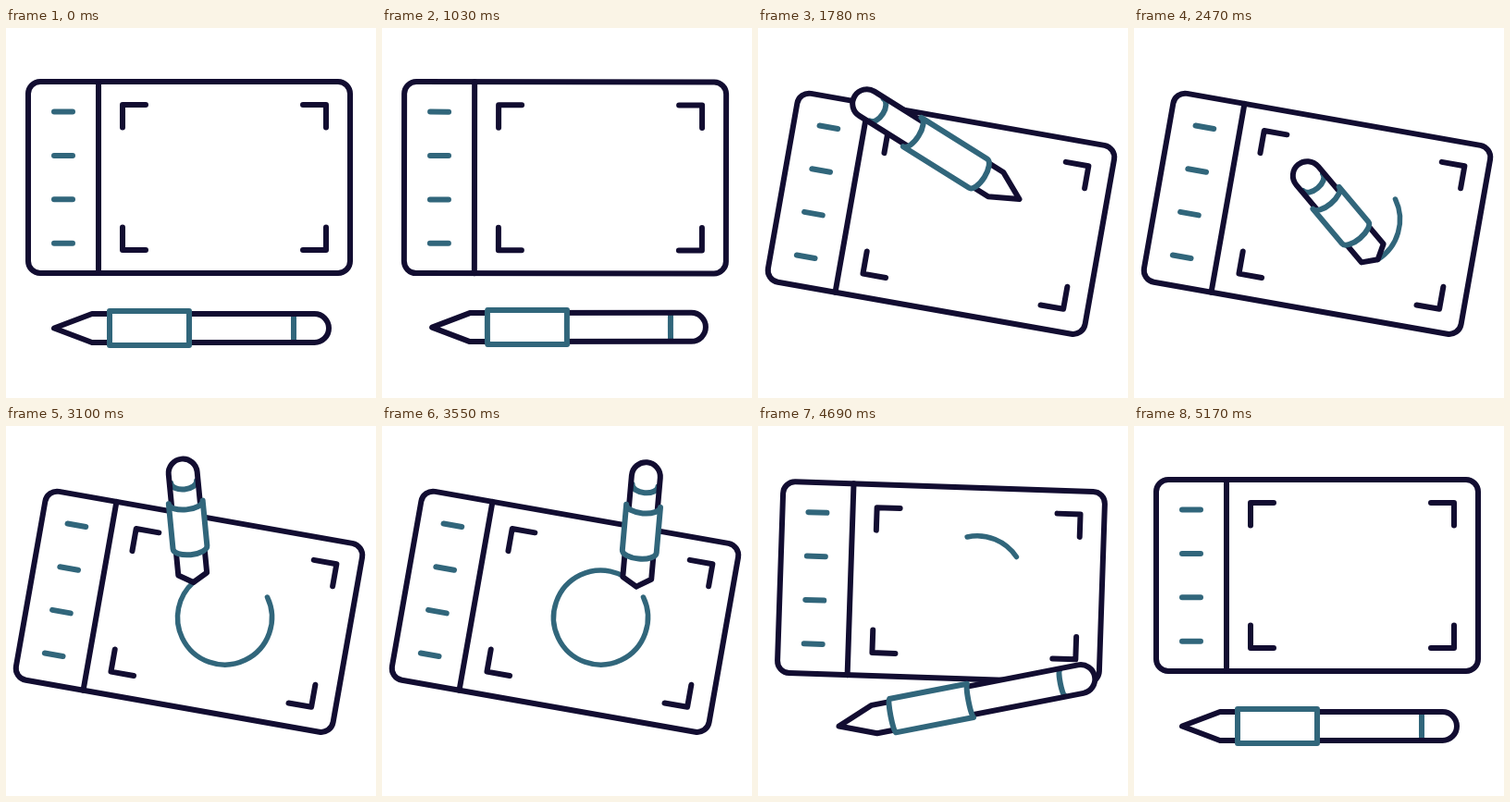
An HTML page with a canvas for the animation above (5.23 s loop, 400 by 400 pixels).

```html
<!DOCTYPE html>
<html lang="en">
<head>
<meta charset="utf-8">
<title>Drawing tablet</title>
<style>
html, body { margin: 0; width: 100%; height: 100%; overflow: hidden; background: #fff; }
canvas { display: block; width: 400px; height: 400px; }
</style>
</head>
<body>
<canvas id="stage" width="400" height="400"></canvas>
<script>
const ctx = document.getElementById('stage').getContext('2d');
const LOOP = 5230, REST = 1030, STEP = 30;
const DARK = '#120d31', TEAL = '#31667b';
const RAD = Math.PI / 180, UP = -Math.PI / 2, DOWN = Math.PI / 2;
const RADIUS = 51, TILT = 10, START = -25.6;

// Pen parts as distances from the tip, from most to least foreshortened
const SHAPES = [
  { len: 134, cone: 9, front: 34, back: 83, stripe: 105 },
  { len: 210, cone: 30, front: 48.6, back: 132.6, stripe: 178 },
  { len: 297, cone: 41, front: 60, back: 146, stripe: 259 }
];

const mix = (a, b, p) => a + (b - a) * p;

function ease(t, from, to) {
  const p = Math.min(1, Math.max(0, (t - from) / (to - from)));
  return p * p * (3 - 2 * p);
}

function line(color, ...pts) {
  ctx.strokeStyle = color;
  ctx.beginPath();
  for (let i = 0; i < pts.length; i += 2) ctx.lineTo(pts[i], pts[i + 1]);
  ctx.stroke();
}

function drawTablet(tilt, drawn, erased) {
  ctx.save();
  ctx.translate(198, mix(161.5, 200.8, tilt));
  ctx.rotate(tilt * TILT * RAD);

  ctx.strokeStyle = DARK;
  ctx.beginPath();
  ctx.roundRect(-174, -103.5, 348, 207, 13);
  ctx.stroke();
  line(DARK, -98, -103.5, -98, 103.5);

  for (let i = 0; i < 4; i++) {
    const y = -71 + i * 47.4;
    line(TEAL, -146, y, -126, y);
  }
  for (const sx of [-1, 1]) {
    for (const sy of [-1, 1]) {
      const x = 38 + sx * 110, y = sy * 78.5;
      line(DARK, x, y - sy * 24.5, x, y, x - sx * 25, y);
    }
  }

  if (drawn > erased) {
    const from = START - TILT;
    ctx.strokeStyle = TEAL;
    ctx.lineWidth = 5.5;
    ctx.beginPath();
    ctx.arc(39, -0.5, RADIUS, (from + 360 * erased) * RAD, (from + 360 * drawn) * RAD);
    ctx.stroke();
  }
  ctx.restore();
}

function drawPen(x, y, angle, len) {
  const i = len < SHAPES[1].len ? 0 : 1;
  const a = SHAPES[i], b = SHAPES[i + 1];
  const at = part => mix(a[part], b[part], (len - a.len) / (b.len - a.len));
  const half = 15.5, wide = 18.5, cone = at('cone');
  const bulge = Math.min(8, (297 - len) * 0.13);
  const rim = (path, part, r, flip) => flip
    ? path.ellipse(at(part) + bulge / 2, 0, bulge, r, 0, DOWN, 3 * DOWN)
    : path.ellipse(at(part) + bulge / 2, 0, bulge, r, 0, UP, DOWN, true);

  ctx.save();
  ctx.translate(x, y);
  ctx.rotate(angle * RAD);
  ctx.fillStyle = '#fff';

  const body = new Path2D();
  body.moveTo(0, 0);
  body.lineTo(cone, -half);
  body.arc(len - half, 0, half, UP, DOWN);
  body.lineTo(cone, half);
  body.closePath();
  ctx.fill(body);

  const stripe = new Path2D();
  rim(stripe, 'stripe', half - 1.5);
  ctx.strokeStyle = TEAL;
  ctx.stroke(stripe);
  ctx.strokeStyle = DARK;
  ctx.stroke(body);

  const band = new Path2D();
  rim(band, 'front', wide);
  rim(band, 'back', wide, true);
  band.closePath();
  ctx.fill(band);
  ctx.strokeStyle = TEAL;
  ctx.stroke(band);
  ctx.restore();
}

function render(t) {
  const drawn = ease(t, 1870, 3790), erased = ease(t, 4200, 4880);
  const tilt = ease(t, 1000, 1570) - erased;

  // The tip rides the circle, slightly past its end, between leaving and reaching its resting place
  const ride = (START + 360 * drawn + 36 * ease(t, 3790, 4090)) * RAD;
  const homeX = 1 - ease(t, 1000, 1529) + ease(t, 4060, 4895);
  const homeY = 1 - ease(t, 1000, 1665) + ease(t, 4030, 4640);
  const x = mix(236.5 + RADIUS * Math.cos(ride), 52, homeX);
  const y = mix(207.1 + RADIUS * Math.sin(ride), 324.5, homeY);

  // Swing over, straighten while drawing, lie down again
  const angle = -148 * ease(t, 1020, 1790) + 63 * ease(t, 1900, 3520) + 85 * ease(t, 3845, 4936);
  const len = 297 - 87 * ease(t, 1000, 1430) - 76 * ease(t, 1780, 2130) + 163 * ease(t, 3490, 4970);

  ctx.fillStyle = '#fff';
  ctx.fillRect(0, 0, 400, 400);
  ctx.lineWidth = 6;
  ctx.lineCap = ctx.lineJoin = 'round';
  drawTablet(tilt, drawn, erased);
  drawPen(x, y, angle, len);
}

const begin = performance.now();

function tick() {
  const t = (performance.now() - begin) % LOOP;
  const k = Math.floor((t - REST) / STEP);
  render(t < REST ? 0 : Math.min(LOOP - 2 * STEP, REST + k * STEP));
  requestAnimationFrame(tick);
}
tick();
</script>
</body>
</html>
```
